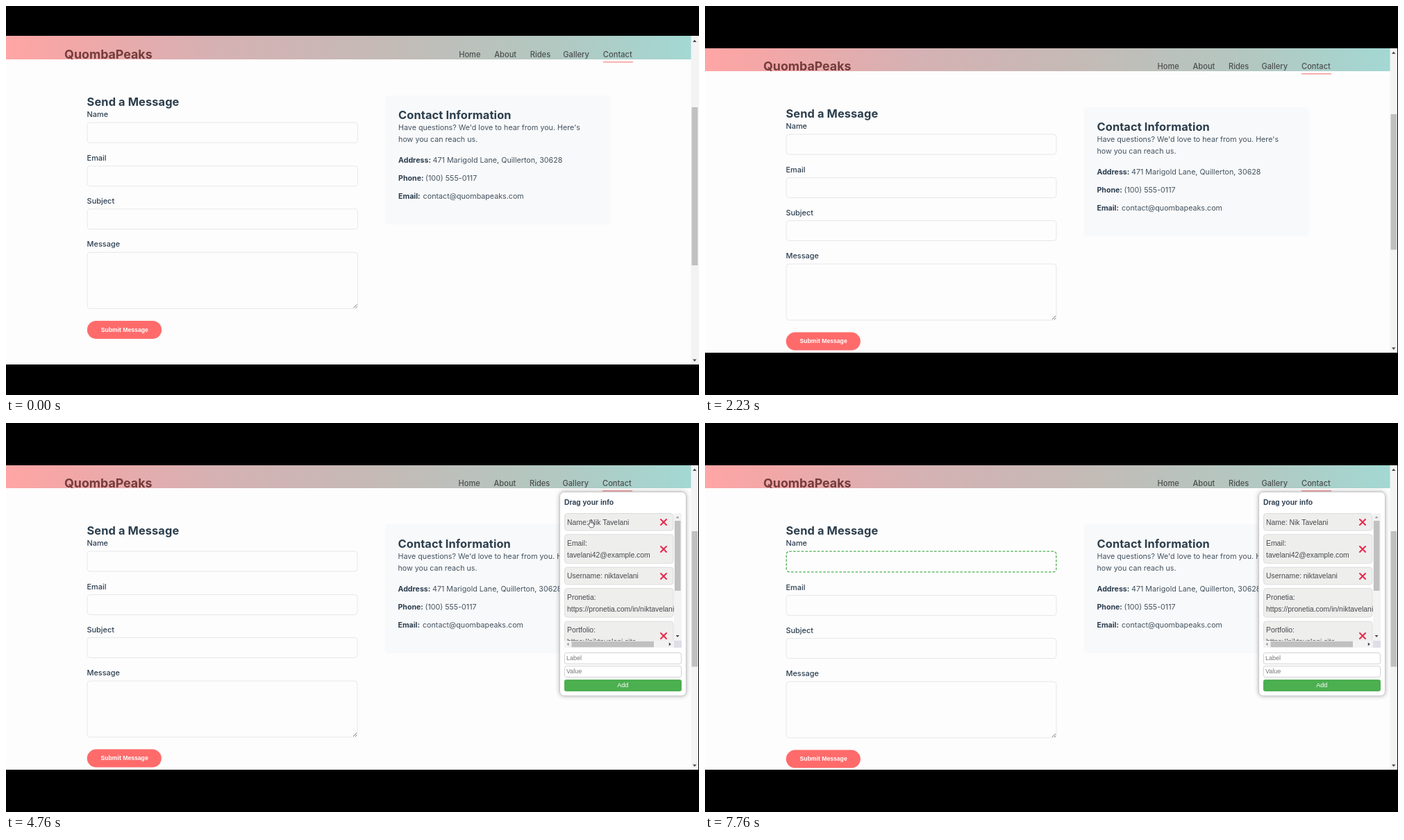
These frames come from a looping animation (998x561 px, 8000 ms). An HTML page:

```html
<!DOCTYPE html>
<html lang="en">
<head>
<meta charset="utf-8">
<title>Drag your info</title>
<style>
html, body { margin: 0; width: 100%; height: 100%; overflow: hidden; background: #000; }
svg { display: block; }
#stage { position: relative; width: 998px; height: 561px; overflow: hidden; background: #fdfdfd; }
#page { position: absolute; inset: 0; }

/* every timeline shares one 8 s loop */
#stage, #page .body, .thumb, .up, .down, .rest, .idle, .hot, #panel, .list,
#cursor, .arrow, .hand { animation: 8s step-end infinite; }

#page text { font-family: Inter, "Open Sans", sans-serif; font-size: 10.7px; fill: #43525f; }
#page .h { font-size: 16.4px; font-weight: 700; letter-spacing: .1px; fill: #2c3e4c; }
#page .l { font-size: 10.9px; font-weight: 500; fill: #2c3e50; }
#page .b { font-size: 10.6px; font-weight: 700; fill: #2c3e50; }
#page .n { font-size: 11.1px; font-weight: 500; fill: #4c5050; }
#page .brand { font-size: 17.8px; font-weight: 700; fill: #743c3c; }
#page .btn { font: bold 8.65px "Liberation Sans", Arial, sans-serif; fill: #fff; }
.field { fill: #fdfdfd; stroke: #e6e7ea; }
.hot { fill: none; stroke: #4caf50; stroke-width: 1.3; stroke-dasharray: 3.6 2.2; }

#panel {
  position: absolute; top: 99px; left: 797px; width: 183px; height: 295px;
  box-sizing: border-box; border: 1px solid #c9c9cc; border-radius: 7px; background: #fff;
  box-shadow: 0 0 6px rgba(0, 0, 0, .3);
  font: 9px "Liberation Sans", Arial, sans-serif; color: #757575;
}
#panel h3 { position: absolute; left: 6px; top: 5px; margin: 0; font-size: 10.4px; line-height: 20px; color: #2c3e50; white-space: nowrap; }
.list { position: absolute; left: 6px; top: 30px; }
.list text { font: 10.4px "Liberation Sans", Arial, sans-serif; fill: #47494c; }
.item { fill: #eeeeed; stroke: #dcdcde; }
.x { fill: none; stroke: #e62c4f; stroke-width: 2.1; stroke-linecap: round; }
.form { position: absolute; left: 6px; right: 6.5px; bottom: 6px; }
.form div { box-sizing: border-box; height: 17px; line-height: 15px; margin-top: 2.6px; padding-left: 2px; border: 1px solid #d3d3d6; border-radius: 3px; background: #fff; }
.form .add { border: 0; background: #4caf50; color: #fff; line-height: 17px; text-align: center; padding: 0; }

#cursor { position: absolute; left: 0; top: 0; overflow: visible; animation-timing-function: ease-in-out; }
#cursor path { fill: #fff; stroke: #55555c; stroke-width: .9; stroke-linejoin: round; }

#stage { animation-name: crop; }
#page .body { animation-name: shift; }
.thumb { animation-name: thumb; }
.up { animation-name: up; }
.down { animation-name: down; }
.rest { animation-name: nudge; }
.idle { animation-name: off-late; }
.hot { animation-name: on-late; }
#panel { animation-name: panel; }
.list { animation-name: list; }
#cursor { animation-name: move; }
.arrow { animation-name: arrow; }
.hand { animation-name: hand; }

@keyframes crop {
  0% { clip-path: inset(43.5px 0 44px 0); }
  .375%, to { clip-path: inset(61px 1px 61px 0); }
}
@keyframes shift {
  0% { transform: translateY(-17.1px) scale(1.001); }
  .375%, to { transform: none; }
}
@keyframes thumb {
  0% { y: 146px; height: 228px; }
  .375%, to { y: 156px; height: 195.5px; }
}
@keyframes up { 0% { transform: translateY(-17px); } .375%, to { transform: none; } }
@keyframes down { 0% { transform: translateY(17px); } .375%, to { transform: none; } }
@keyframes nudge { 0% { transform: none; } 96.25%, to { transform: translateY(1px); } }
@keyframes off-late { 0% { opacity: 1; } 96.25%, to { opacity: 0; } }
@keyframes on-late { 0% { opacity: 0; } 96.25%, to { opacity: 1; } }
@keyframes panel {
  0% { visibility: hidden; left: 847px; width: 133px; height: 100.5px; }
  41.5% { visibility: visible; left: 847px; width: 133px; height: 100.5px; }
  42.5%, to { visibility: visible; left: 797px; width: 183px; height: 295px; }
}
@keyframes list { 0% { visibility: hidden; } 42.5%, to { visibility: visible; } }
@keyframes move {
  0%, 10% { transform: translate(745px, 30px); }
  17.5% { transform: translate(707px, 142px); }
  20.5%, 22.5% { transform: translate(707.5px, 142px); }
  27.875% { transform: translate(806px, 44px); }
  39.5% { transform: translate(812px, 44px); }
  42% { transform: translate(810px, 60px); }
  44.5%, 49.125% { transform: translate(813px, 60px); }
  50%, 52% { transform: translate(760px, 180px); }
  59.5%, 65% { transform: translate(842px, 140px); }
  66.625%, to { transform: translate(839.5px, 142.5px); }
}
@keyframes arrow { 0% { opacity: 1; } 55.8%, to { opacity: 0; } }
@keyframes hand { 0% { opacity: 0; } 55.8% { opacity: 1; } 96.25%, to { opacity: 0; } }
</style>
</head>
<body>
<div id="stage">
  <svg id="page" width="998" height="561">
    <defs>
      <linearGradient id="sky">
        <stop offset="0" stop-color="#ffa5a5"/>
        <stop offset=".1" stop-color="#f2a7a7"/>
        <stop offset=".3" stop-color="#d6b1b3"/>
        <stop offset=".55" stop-color="#c4bab6"/>
        <stop offset=".8" stop-color="#b2c8c1"/>
        <stop offset="1" stop-color="#a3d8d3"/>
      </linearGradient>
    </defs>
    <g class="body">
      <rect y="60" width="987" height="34" fill="url(#sky)"/>
      <text class="brand" x="84" y="93">QuombaPeaks</text>
      <text class="n" x="651.5" y="90.6">Home</text>
      <text class="n" x="702.5" y="90.6">About</text>
      <text class="n" x="754" y="90.6">Rides</text>
      <text class="n" x="801.5" y="90.6">Gallery</text>
      <text class="n" x="859" y="90.6">Contact</text>
      <rect x="859" y="97" width="43" height="1.6" fill="#f5a09c"/>

      <text class="h" x="116.5" y="160.7">Send a Message</text>
      <text class="l" x="116.5" y="176.9">Name</text>
      <rect class="field idle" x="117" y="185" width="389" height="29" rx="4"/>
      <rect class="hot" x="117.2" y="185.2" width="388.6" height="29.6" rx="4"/>
      <g class="rest">
        <text class="l" x="116.5" y="239.7">Email</text>
        <rect class="field" x="117" y="247.5" width="389" height="29" rx="4"/>
        <text class="l" x="116.5" y="301.9">Subject</text>
        <rect class="field" x="117" y="309.5" width="389" height="29" rx="4"/>
        <text class="l" x="116.5" y="363.9">Message</text>
        <rect class="field" x="117" y="372" width="389" height="81" rx="4"/>
        <path d="M500 452l5-5M503 452l2-2" stroke="#666" stroke-width=".9"/>
        <rect x="116.7" y="470.6" width="107.2" height="26" rx="13" fill="#ff6b6b"/>
        <text class="btn" x="136.5" y="486.2">Submit Message</text>
      </g>

      <rect x="545.5" y="146" width="324.5" height="186" rx="5" fill="#f8f9fa"/>
      <text class="h" x="564.5" y="180.3">Contact Information</text>
      <text x="564.5" y="196.4">Have questions? We'd love to hear from you. Here's</text>
      <text x="564.5" y="213">how you can reach us.</text>
      <text class="b" x="564.5" y="242.8">Address:</text>
      <text x="614" y="242.8">471 Marigold Lane, Quillerton, 30628</text>
      <text class="b" x="564.5" y="269">Phone:</text>
      <text x="603.5" y="269">(100) 555-0117</text>
      <text class="b" x="564.5" y="295">Email:</text>
      <text x="600" y="295">contact@quombapeaks.com</text>
    </g>
    <rect x="986.5" width="12" height="561" fill="#f3f3f4"/>
    <rect class="thumb" x="987.5" y="156" width="8.7" height="195.5" fill="#c0c0c1"/>
    <path class="up" d="M989 69h5.4l-2.7-3.2z" fill="#444"/>
    <path class="down" d="M989 492.5h5.4l-2.7 3.2z" fill="#444"/>
  </svg>

  <div id="panel">
    <h3>Drag your info</h3>
    <svg class="list" width="169" height="194" viewBox="804 130 169 194">
      <rect class="item" x="804.5" y="130.5" width="156.5" height="24.5" rx="4"/>
      <rect class="item" x="804.5" y="160.8" width="156.5" height="41.5" rx="4"/>
      <rect class="item" x="804.5" y="208" width="156.5" height="25" rx="4"/>
      <rect class="item" x="804.5" y="238.5" width="156.5" height="41.5" rx="4"/>
      <rect class="item" x="804.5" y="286" width="156.5" height="41.5" rx="4"/>
      <text x="808" y="146.6">Name: Nik Tavelani</text>
      <text x="808" y="177.2">Email:</text>
      <text x="808" y="193.7">tavelani42@example.com</text>
      <text x="808" y="224.3">Username: niktavelani</text>
      <text x="808" y="255">Pronetia:</text>
      <text x="808" y="271.6">https://pronetia.com/in/niktavelani</text>
      <text x="808" y="302.2">Portfolio:</text>
      <text x="808" y="318.7">https://niktavelani.site</text>
      <path class="x" d="M943 139l8 8m0-8l-8 8M943 178l8 8m0-8l-8 8M943 217l8 8m0-8l-8 8M943 303l8 8m0-8l-8 8"/>
      <rect x="962" y="130" width="11" height="184" fill="#f3f3f4"/>
      <rect x="804" y="314" width="158" height="10" fill="#f3f3f4"/>
      <rect x="962" y="314" width="11" height="10" fill="#dfdde6"/>
      <rect x="963" y="141" width="8.5" height="101" fill="#c0c0c1"/>
      <rect x="814.5" y="314.8" width="118.5" height="8.5" fill="#c0c0c1"/>
      <path d="M964.6 137.2h5l-2.5-3zM810.6 316.5v5l-3-2.5z" fill="#a0a0a3"/>
      <path d="M964.6 306h5l-2.5 3zM954.8 316.5v5l3-2.5z" fill="#444"/>
    </svg>
    <div class="form">
      <div>Label</div>
      <div>Value</div>
      <div class="add">Add</div>
    </div>
  </div>

  <svg id="cursor" width="1" height="1">
    <path class="arrow" d="M.4 .2v8.2l1.9-1.7 1.3 2.8 1.3-.6-1.3-2.7h2.5z"/>
    <path class="hand" d="M-1.6 1q0-1.1 .9-1.1t.9 1.1v3.1q1-.7 1.7 .2 1-.5 1.6 .4 1.3-.2 1.3 1v2.1q0 2.6-2.2 3h-2.6q-1.2-.4-2-1.8l-1.9-2.7q-.2-1.2 1-.9l1.3 1z"/>
  </svg>
</div>
</body>
</html>
```
